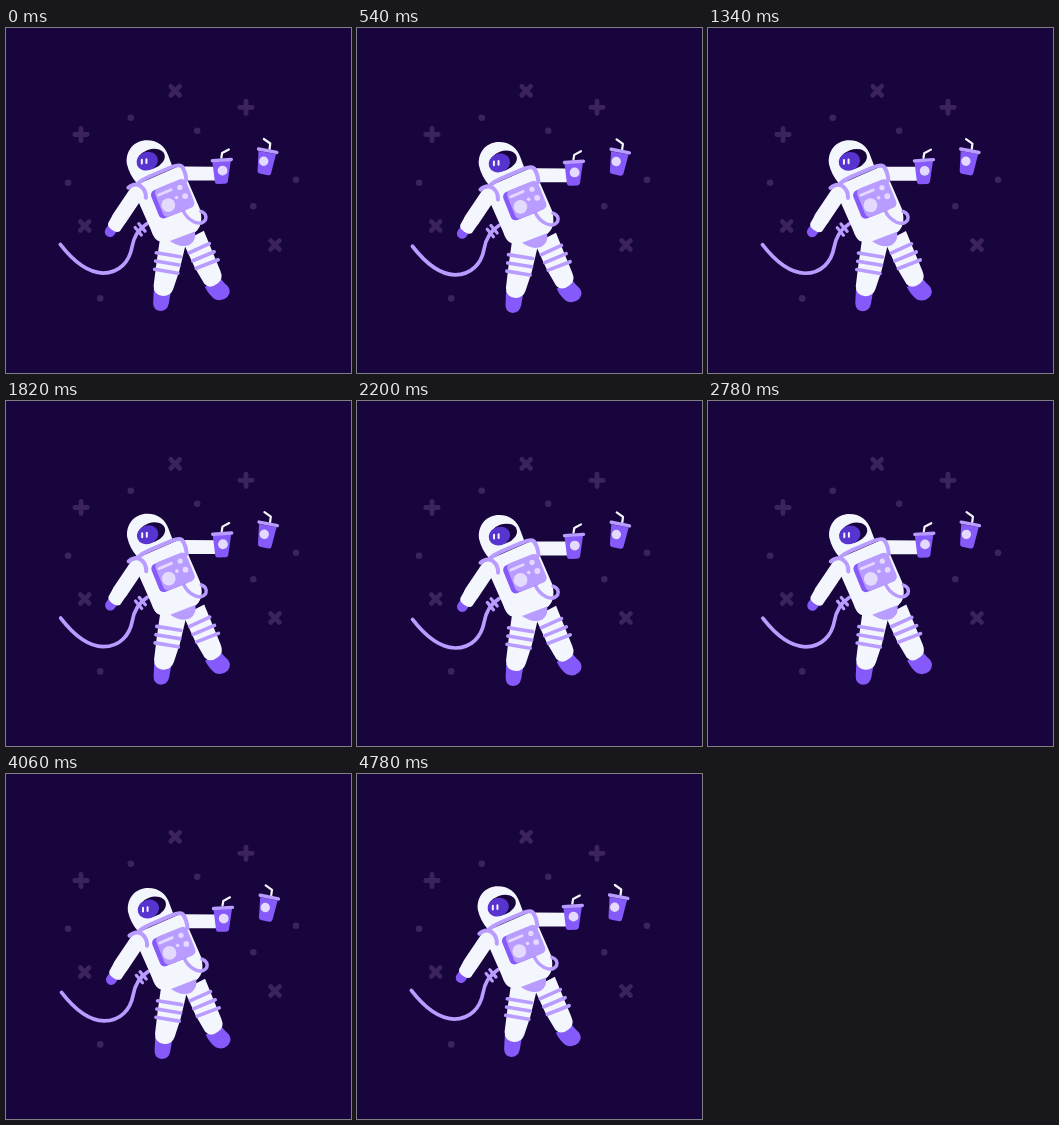
Animation of 345x345 px, one loop 4800 ms. Source, as an HTML page:

```html
<!DOCTYPE html>
<html lang="en">
<head>
<meta charset="utf-8">
<title>Floating astronaut</title>
<style>
  html, body { margin: 0; width: 100%; height: 100%; overflow: hidden; background: #19053d; }
  svg { display: block; width: 100%; height: 100%; }
  .line { fill: none; stroke-linecap: round; stroke-linejoin: round; }
  .white { fill: #f3f6fc; }
  .lilac { fill: #b99cff; }
  .violet { fill: #8659fa; }
  .pale { fill: #e4daff; }
  .sw { stroke: #f3f6fc; }
  .sl { stroke: #b99cff; }
  .sv { stroke: #8659fa; }
</style>
</head>
<body>
<svg viewBox="0 0 345 345">
  <rect width="345" height="345" fill="#19053d"/>
  <g id="sky" fill="#3b245c" stroke="#3b245c"></g>

  <g id="cup">
    <path class="line sw" stroke-width="2.2" d="M264 121L264.7 115.5L258.3 111"/>
    <path class="violet" d="M253 123L270.5 126L265.5 145.5Q264.8 147.700 262.300 147.300L254 145.600Q251.800 145 252 143Z"/>
    <path class="line sl" stroke-width="3.4" d="M253 121L271.3 124.4"/>
    <circle class="pale" cx="258.2" cy="133.2" r="4.700"/>
  </g>

  <g id="body">
    <g class="line sl">
      <path stroke-width="3.7" d="M54.5 216.7C65 230.300 80 244.800 97 245.300C114 245.300 123.500 233.300 126 220C128 208 133 201 141 196"/>
      <path stroke-width="3.2" d="M129.300 199.700L135.500 207.200M133 196L139.200 203.400"/>
    </g>

    <g id="legR">
      <path class="violet" d="M199 259L215 251Q218 255 222 258.500Q226 264 221.500 269.300Q216 274.500 209 271.500Q203 267 199 259Z"/>
      <path class="white" d="M177 214L198 203L214.500 243Q218 251 212 255.500Q204 262 198.500 256L189 240Z"/>
      <path class="line sl" stroke-width="3.6" d="M183.500 225L203.500 215.800M187 233L208.300 224M190.500 240.500L212.300 232"/>
    </g>
    <g id="legL">
      <path class="violet" d="M148 261L165 264L163 275.500Q161.500 283.300 154.500 283.300Q147.300 282.500 147.300 275Z"/>
      <path class="white" d="M154 212L180 216L173.500 243L167.500 261Q165 268.500 157 268.300Q147.500 267 147.800 258L150.500 236Z"/>
      <path class="line sl" stroke-width="3.6" d="M150.500 225L174.500 229M149.700 233.300L173.500 237.300M148.800 241.500L172 245.500"/>
    </g>

    <path class="white" d="M178 138.700L210 138.900V152.700L180 152.700Z"/>
    <path class="white" d="M126 159L174 138L181 151L194 181Q199 199 187 206Q166 219 152 213Q148 211 145 202Z"/>
    <path class="lilac" d="M164 213.300L189 203.700Q191 212 184 217Q175 221 164 213.300Z"/>

    <path class="line sv" stroke-width="10.500" d="M104.200 204L107 200"/>
    <path class="line sw" stroke-width="15.500" d="M130.500 165.500L114 190"/>
    <path class="white" d="M107.500 186L120.500 194L114 203.500Q111 205.500 106 202Q101 198.500 102.500 195Z"/>
    <path class="line sl" stroke-width="4" d="M122.500 160Q129 154.500 135 158.500Q140.500 163 140 170"/>

    <path class="white" d="M121 136C119.500 122 129 112.400 141 112.400C152 112.400 159.500 118.500 162.500 128L167 140L131 155.500Q123.500 147 121 136Z"/>
    <path class="line sl" stroke-width="4" d="M131.500 156.500Q135 152.500 143 149L164 140Q172.500 136 176 138.700Q179.800 144 180.500 152.500"/>

    <ellipse cx="145.200" cy="131.300" rx="14.200" ry="9.700" transform="rotate(-20 145.200 131.300)" fill="#19053d"/>
    <ellipse cx="141.400" cy="133.400" rx="10.900" ry="9.200" transform="rotate(-20 141.400 133.400)" fill="#5734cf"/>
    <path class="line sw" stroke-width="2" d="M136 132V135.800M140.600 131.500V135.300"/>

    <path class="line sl" stroke-width="3.400" d="M177 182Q180 190 188 194Q196 197.500 199.700 192Q201.500 186 195 183.500"/>
    <g transform="translate(168.500 170) rotate(-22)">
      <rect class="violet" x="-21" y="-14.500" width="32" height="30" rx="5"/>
      <rect class="lilac" x="-16.500" y="-15" width="33.500" height="30.500" rx="5"/>
    </g>
    <path class="line" stroke="#e4daff" stroke-width="2.800" d="M152.800 167.300L165.300 162"/>
    <g class="pale">
      <circle cx="162.500" cy="177.300" r="6.900"/>
      <circle cx="174" cy="159.700" r="2.600"/>
      <circle cx="179.300" cy="168.300" r="2.900"/>
      <circle cx="170.700" cy="169.800" r="1.800"/>
    </g>

    <path class="line sw" stroke-width="2.200" d="M215.500 130L216.300 125.300L223 121.700"/>
    <path class="violet" d="M206.500 134L225 133L222 153.800Q221.700 155.800 219.300 156L211.500 156.200Q209.300 156.200 209 154Z"/>
    <path class="line sl" stroke-width="3.400" d="M206.500 132.900L225.500 131.700"/>
    <circle class="pale" cx="216.700" cy="142.900" r="4.900"/>
  </g>
</svg>
<script>
  const LOOP = 4800, CYCLES = 3, PHASE = 0.05;
  const $ = id => document.getElementById(id);

  const dots = [[124.8, 89.8], [191.2, 102.8], [62.1, 154.7], [290, 151.8], [247.3, 178.2], [94.2, 270.4]];
  const stars = [[169.2, 62.8, 45], [240, 79.3, 0], [75, 106.5, 0], [78.7, 198, 45], [269, 217, 45]];
  $("sky").innerHTML =
    dots.map(([x, y]) => `<circle cx="${x}" cy="${y}" r="3.3" stroke="none"/>`).join("") +
    stars.map(([x, y, a]) =>
      `<path class="line" stroke-width="4.8" transform="translate(${x} ${y}) rotate(${a})" d="M-6.2 0H6.2M0 -6.2V6.2"/>`
    ).join("");

  const move = (id, x, y, a = 0, cx = 0, cy = 0) =>
    $(id).setAttribute("transform", `translate(${x} ${y}) rotate(${a} ${cx} ${cy})`);

  function draw(ms) {
    const turn = ms / LOOP * CYCLES + PHASE;
    const u = (1 - Math.cos(turn * 2 * Math.PI)) / 2;
    move("body", 1.3 * u - 0.2, 2.1 * u - 0.3);
    move("legL", 0, 0, -0.3 * u, 166, 214);
    move("legR", 0, 0, 0.4 * u, 186, 210);
    move("cup", 1.7 * u - 0.5, 0.4 * u, 0.8 * u, 261, 133);
  }

  function tick(now) {
    draw(now % LOOP);
    requestAnimationFrame(tick);
  }
  draw(0);
  requestAnimationFrame(tick);
</script>
</body>
</html>
```
